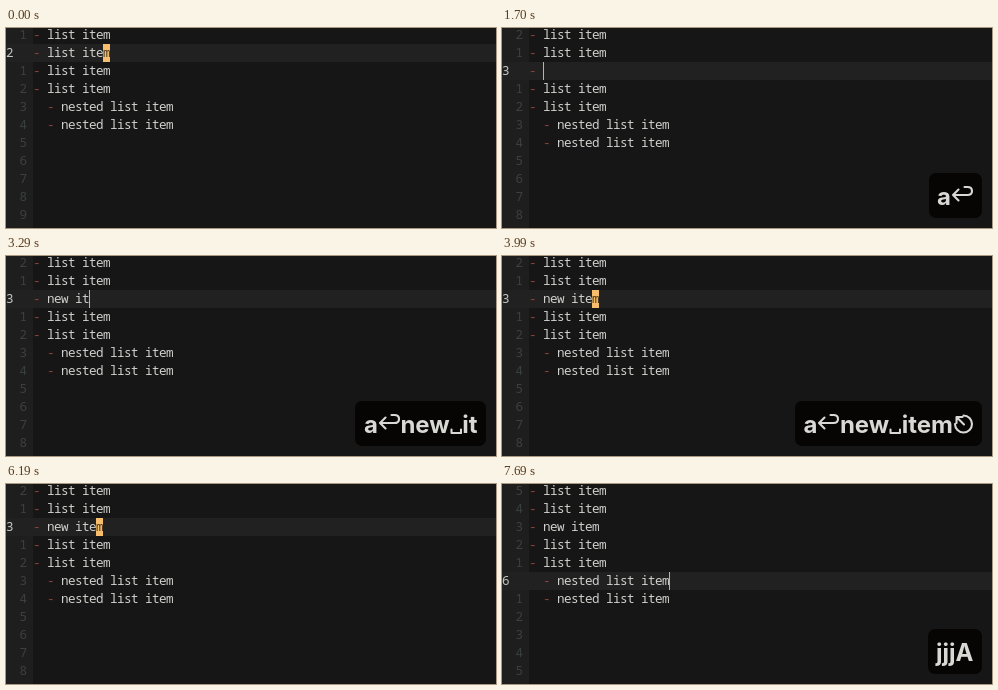
Animation, 490 px wide and 200 px high, one loop 8000 ms. Source, as an HTML page:

```html
<!DOCTYPE html>
<html lang="en">
<head>
<meta charset="utf-8">
<title>List editing</title>
<style>
html, body { margin: 0; width: 490px; height: 200px; overflow: hidden; background: #161616; }
#stage { position: relative; width: 490px; height: 200px; overflow: hidden; background: #161616;
  font: 12.6px/18px "Noto Sans Mono", "DejaVu Sans Mono", monospace; letter-spacing: -.56px; color: #d0d0cd; }
#stage > * { position: absolute; }
#gutter { left: 0; top: 0; width: 27px; height: 200px; background: #1e1e1e; }
#rows { left: 0; top: -2px; width: 490px; }
.row { position: relative; height: 18px; white-space: pre; }
.row.now { background: #212121; }
.row > * { position: absolute; top: 0; }
.num { right: 469.5px; color: #3d4040; }
.now .num { right: auto; left: 0; color: #c6c6c2; }
.text { left: 27px; }
.text i { font-style: normal; color: #8e4438; }
.cursor { height: 18px; color: #4a381f; }
.block { width: 7px; background: #f6bd6c; }
.bar { width: 1.2px; background: #e8a868; }
#keys { right: 10px; top: 145px; height: 45px; padding: 0 8.5px; border-radius: 7px; background: #060504;
  display: flex; color: #d8d8d4; font: 700 24px/47px Inter, "Open Sans", sans-serif; letter-spacing: 0; white-space: pre; }
#keys svg { height: 47px; fill: none; stroke: currentColor; stroke-width: 2.1; stroke-linecap: round; stroke-linejoin: round; }
</style>
</head>
<body>
<div id="stage">
  <div id="gutter"></div>
  <div id="rows"></div>
  <div id="keys"></div>
</div>
<script>
const LOOP = 8000, ROWS = 12;
const rows = document.getElementById("rows");
const keys = document.getElementById("keys");

const icon = (w, d) => `<svg width="${w}" viewBox="0 0 ${w} 47"><path d="${d}"/></svg>`;
const ICONS = {
  "⏎": icon(22.5, "M7.5 16.5L2 22L7.5 27.5M2 22H16.5Q21 22 21 18Q21 14 16.5 14H13.5"),
  "␣": icon(12.5, "M1.5 28.5V32H11V28.5"),
  "⎋": icon(20.5, "M10.5 14.5A8.5 8.5 0 1 1 2 23M11 23.5L4 16.5M3.5 22V16H9.5")
};

// Each step changes only the listed parts of the state.
const steps = [
  [0, { added: null, line: 2, col: 10, bar: false, keys: "", alpha: 0 }],
  [500, { keys: "a", alpha: .35 }],
  [600, { col: 11, bar: true, alpha: .7 }],
  [700, { alpha: 1 }],
  [1500, { keys: "a⏎" }],
  [1700, { added: "", line: 3, col: 2 }],
  ...typing([[2700, "n"], [2800, "new"], [2900, "new "], [3090, "new i"]]),
  [3190, { keys: "a⏎new␣it" }],
  ...typing([[3290, "new it"], [3390, "new ite"], [3490, "new item"]]),
  [3890, { keys: "a⏎new␣item⎋" }],
  [3990, { col: 9, bar: false }],
  [5990, { alpha: .8 }],
  [6090, { alpha: .35 }],
  [6190, { alpha: 0 }],
  [6690, { keys: "j", alpha: .35 }],
  [6790, { line: 4, alpha: .7 }],
  [6890, { keys: "jj", line: 5, alpha: .97 }],
  [6990, { keys: "jjj", alpha: 1 }],
  [7090, { line: 6 }],
  [7590, { keys: "jjjA" }],
  [7690, { col: 20, bar: true }]
];

function typing(list) {
  return list.map(([t, s]) => [t, { added: s, col: 2 + s.length, keys: "a⏎" + s.replace(" ", "␣") }]);
}

function linesOf(added) {
  const item = "- list item", nested = "  - nested list item";
  const fresh = added === null ? [] : ["- " + added];
  return [item, item, ...fresh, item, item, nested, nested];
}

function cursorHtml(s, text) {
  const kind = s.bar ? "bar" : "block";
  const char = s.bar ? "" : text[s.col];
  return `<span class="cursor ${kind}" style="left:${27 + 7 * s.col}px">${char}</span>`;
}

function draw(s) {
  const lines = linesOf(s.added);
  let html = "";
  for (let n = 1; n <= ROWS; n++) {
    const now = n === s.line, text = lines[n - 1] || "";
    html += `<div class="row${now ? " now" : ""}">` +
      `<span class="num">${now ? n : Math.abs(n - s.line)}</span>` +
      `<span class="text">${text.replace("-", "<i>-</i>")}</span>` +
      (now ? cursorHtml(s, text) : "") + "</div>";
  }
  rows.innerHTML = html;
  keys.innerHTML = s.keys.replace(/[⏎␣⎋]|[a-zA-Z]+/g, k => ICONS[k] || `<span>${k}</span>`);
  keys.style.opacity = s.alpha;
}

const start = performance.now();
let shown = -1;
function tick() {
  const t = (performance.now() - start) % LOOP;
  const count = steps.filter(([at]) => at <= t).length;
  if (count !== shown) {
    shown = count;
    draw(Object.assign({}, ...steps.slice(0, count).map(step => step[1])));
  }
  requestAnimationFrame(tick);
}
tick();
</script>
</body>
</html>
```
